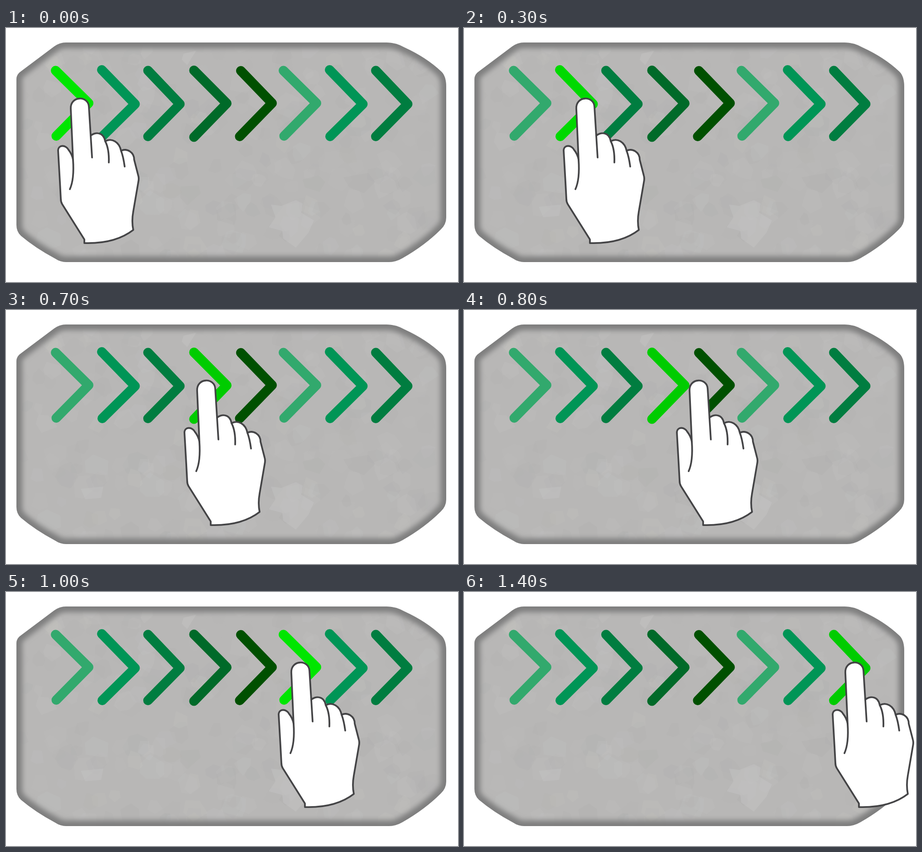
These frames come from a looping animation (998x561 px, 1500 ms). An HTML page:

```html
<!DOCTYPE html>
<html lang="en">
<head>
<meta charset="utf-8">
<title>Swipe right</title>
<style>
  html, body { margin: 0; width: 100%; height: 100%; overflow: hidden; background: #fff; }
  svg { display: block; width: 998px; height: 561px; }
  #arrows path { fill: none; stroke-width: 21; stroke-linecap: round; stroke-linejoin: round; }
  #hand path { stroke: #444446; stroke-width: 3.8; stroke-linecap: round; stroke-linejoin: round; }
</style>
</head>
<body>
<svg viewBox="0 0 998 561">
  <defs>
    <path id="plate" d="M133 32H840Q861 32 880 43Q928 65 961 96Q972 106 972 130V418Q972 434 960 445Q925 480 876 508Q861 517 845 517H133Q120 517 108 509Q65 486 33 459Q23 450 23 434V113Q23 102 34 95L106 41Q118 32 133 32Z"/>
    <clipPath id="inside"><use href="#plate"/></clipPath>
    <filter id="soft" filterUnits="userSpaceOnUse" x="0" y="0" width="998" height="561">
      <feGaussianBlur stdDeviation="6"/>
    </filter>
  </defs>

  <g clip-path="url(#inside)">
    <use href="#plate" fill="#b8b7b6"/>
    <g id="stone"></g>
    <use href="#plate" fill="none" stroke="#7e7e7e" stroke-width="25" filter="url(#soft)"/>
  </g>

  <g id="arrows"></g>

  <g id="hand">
    <path id="skin" fill="#fff" d="M148 291L143 178C142 149 182 149 183 174L187 238C195 230 215 228 219 250C234 242 250 252 254 271C267 265 283 274 283 291L292 326Q294 332 292 341L281 405Q277 427 281 446Q241 477 173 475L173 467L124 389Q121 384 121 377L119 340L115 270C116 257 132 258 138 269Q146 279 148 291Z"/>
    <path fill="none" d="M148 291Q151 334 141 356M187 238L190 286M219 250Q228 267 227 297M254 271Q259 284 262 306"/>
  </g>
</svg>

<script>
const STEP = 100;
const handX = [0, 35, 70, 105, 151, 198, 231, 279, 355, 430, 487, 545, 602, 650, 699];
const litArrow = [0, 0, 1, 1, 1, 2, 2, 3, 3, 4, 5, 5, 6, 6, 7];

const arrows = [
  { d: 'M109.5 94L182.5 166L111 238.5', off: '#32a96d', on: '#00e600' },
  { d: 'M211.5 92.5L285 168L212.5 239.5', off: '#009556', on: '#00d900' },
  { d: 'M313.5 94L384 168L313.5 239.5', off: '#007d40', on: '#00cc00' },
  { d: 'M415 93.5L487.5 166.5L415 241', off: '#006a29', on: '#00cc00' },
  { d: 'M518.5 94.5L587.5 166L516 239.5', off: '#005000', on: '#00c000' }
];

const byId = id => document.getElementById(id);

function addPath(parent, attrs) {
  const el = document.createElementNS('http://www.w3.org/2000/svg', 'path');
  for (const key in attrs) el.setAttribute(key, attrs[key]);
  return parent.appendChild(el);
}

// Hold each value for one step, then jump to the next.
function play(el, prop, values) {
  const n = values.length;
  const frames = values.map((v, i) => ({ [prop]: v, offset: i / n, easing: 'steps(1, end)' }));
  frames.push({ [prop]: values[n - 1], offset: 1 });
  el.animate(frames, { duration: n * STEP, iterations: Infinity });
}

function drawStone() {
  const stone = byId('stone');
  let seed = 17;
  const rand = () => (seed = (seed * 16807) % 2147483647) / 2147483647;
  const patch = (d, light, alpha) =>
    addPath(stone, { d, fill: light ? '#c6c6c5' : '#a8a8a7', 'fill-opacity': alpha });

  for (let i = 0; i < 260; i++) {
    const x = 25 + rand() * 945, y = 35 + rand() * 480;
    const size = 13 + rand() * 14, sides = 5 + Math.floor(rand() * 3);
    const points = Array.from({ length: sides }, (_, k) => {
      const a = (k + rand() * 0.6) / sides * 2 * Math.PI;
      const r = size * (0.75 + rand() * 0.5);
      return `${(x + r * Math.cos(a)).toFixed(1)} ${(y + r * Math.sin(a)).toFixed(1)}`;
    });
    patch(`M${points.join('L')}Z`, rand() < 0.5, 0.04 + rand() * 0.14);
  }
  patch('M585 390L608 393L640 380L655 388L652 408L680 425L668 452L640 485L612 465L610 448L580 440L595 418Z', true, 0.4);
  patch('M392 57L420 50L400 82L388 70Z', true, 0.4);
  patch('M165 395L215 390L210 415L175 418Z', true, 0.35);
  patch('M655 335L690 325L705 340L692 362L660 352Z', false, 0.2);
  patch('M385 350L425 348L430 365L400 392L385 375Z', false, 0.2);
  patch('M745 330L800 320L815 340L790 365L758 352Z', false, 0.18);
}

function drawArrows() {
  for (let i = 0; i < 8; i++) {
    const { d, off, on } = arrows[i % 5];
    const el = addPath(byId('arrows'), { d, stroke: off });
    if (i > 4) el.setAttribute('transform', 'translate(503 0)');
    play(el, 'stroke', litArrow.map(lit => lit === i ? on : off));
  }
}

drawStone();
drawArrows();
play(byId('hand'), 'transform', handX.map(x => `translate(${x}px, 0px)`));
</script>
</body>
</html>
```
